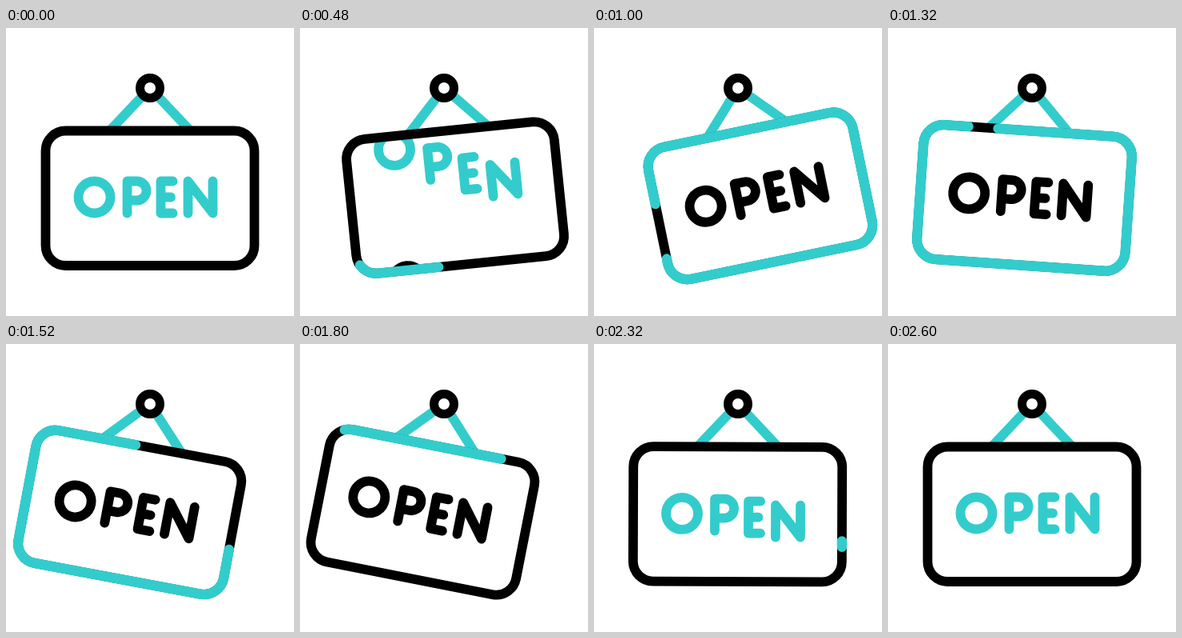
These frames come from a looping animation (360 px wide and 360 px high, 3000 ms). An HTML page:

```html
<!DOCTYPE html>
<html lang="en">
<head>
<meta charset="utf-8">
<title>Open sign</title>
<style>
  html, body { margin: 0; width: 100%; height: 100%; overflow: hidden; background: #fff; }
  svg { display: block; width: 100%; height: 100%; }
  .line { fill: none; stroke-width: 11.8; stroke-linecap: round; stroke-linejoin: round; }
  .teal { stroke: #33cccc; }
  .dark { stroke: #000; }
  #trim { stroke-width: 12.4; }
</style>
</head>
<body>
<svg viewBox="0 0 360 360" role="img" aria-label="OPEN">
  <defs>
    <clipPath id="inside"><rect x="55" y="134" width="250" height="157.5" rx="20"/></clipPath>
    <!-- starts at the bottom right and runs clockwise -->
    <path id="frame" d="M285.5 297H74.5a25 25 0 0 1-25-25V153.5a25 25 0 0 1 25-25H285.5a25 25 0 0 1 25 25V272a25 25 0 0 1-25 25z"/>
    <path id="O" d="M90.5 211.5a20 20 0 0 1 40 0a20 20 0 0 1-40 0z"/>
    <path id="P" d="M151.5 231.5V191.5H163.5a12 12 0 0 1 0 24H151.5"/>
    <path id="E" d="M208.5 191.5H193.5V231.5H208.5M193.5 211.5H206"/>
    <path id="N" d="M227.5 231.5V191.5L258.5 231.5V191.5"/>
  </defs>
  <g id="sign">
    <path class="line teal" d="M130 128L180 75L230 128"/>
    <g id="words" clip-path="url(#inside)"></g>
    <use href="#frame" class="line dark"/>
    <path id="trim" class="line teal"/>
  </g>
  <circle cx="180" cy="75" r="12.5" class="line dark" style="fill:#fff;stroke-width:11"/>
</svg>
<script>
const LOOP = 3000;
const $ = id => document.getElementById(id);
const sign = $('sign'), trim = $('trim'), words = $('words');
trim.setAttribute('d', $('frame').getAttribute('d'));
const LEN = trim.getTotalLength();

const clamp = x => Math.min(1, Math.max(0, x));
const ramp = (t, a, b) => clamp((t - a) / (b - a));
const cubic = x => x < 0.5 ? 4 * x ** 3 : 1 - 4 * (1 - x) ** 3;
const ease = (t, a, b) => cubic(ramp(t, a, b));

// monotone smooth curve through [time, value] points
function curve(pts) {
  const n = pts.length - 1;
  const slope = i => (pts[i + 1][1] - pts[i][1]) / (pts[i + 1][0] - pts[i][0]);
  const m = pts.map((p, i) => {
    if (i === 0 || i === n) return 0;
    const a = slope(i - 1), b = slope(i);
    return a * b > 0 ? 2 * a * b / (a + b) : 0;
  });
  return t => {
    if (t <= pts[0][0]) return pts[0][1];
    if (t >= pts[n][0]) return pts[n][1];
    const i = pts.findIndex(p => p[0] > t) - 1;
    const [t0, v0] = pts[i], [t1, v1] = pts[i + 1];
    const d = t1 - t0, x = (t - t0) / d, y = 1 - x;
    return v0 * (1 + 2 * x) * y * y + v1 * x * x * (3 - 2 * x)
      + d * (m[i] * x * y * y - m[i + 1] * x * x * y);
  };
}

const tailOf = curve([[1000, 0], [1320, 0.045], [1800, 0.755], [2120, 0.96], [2480, 1]]);

function addLetter(id, tone) {
  const el = document.createElementNS('http://www.w3.org/2000/svg', 'use');
  el.setAttribute('href', '#' + id);
  el.setAttribute('class', 'line ' + tone);
  return words.appendChild(el);
}
const letters = [...'OPEN'].map(id => ({ teal: addLetter(id, 'teal'), dark: addLetter(id, 'dark') }));

const shift = (el, y) => el.setAttribute('transform', `translate(0 ${y.toFixed(2)})`);

function drawTrim(t) {
  const x = ramp(t, 130, 2520);
  const spin = x + 0.15 * x * (1 - x);
  const tail = spin + tailOf(t);
  const size = (ease(t, 80, 1355) - tailOf(t)) * LEN;
  trim.style.display = size > 0.5 ? '' : 'none';
  if (size >= LEN - 0.01) {
    trim.style.strokeDasharray = 'none';
    return;
  }
  trim.style.strokeDasharray = `${Math.max(size, 0)} ${LEN - size}`;
  trim.style.strokeDashoffset = -(tail % 1) * LEN;
}

function draw(t) {
  const angle = -12.4 * ease(t, 140, 835) + 23.6 * ease(t, 835, 1680) - 11.2 * ease(t, 1710, 2440);
  sign.setAttribute('transform', `rotate(${angle.toFixed(3)} 180 75)`);
  drawTrim(t);
  letters.forEach(({ teal, dark }, i) => {
    const a = ease(t, 147 + 43 * i, 867 + 43 * i);
    const b = ease(t, 1671 + 34 * i, 2391 + 34 * i);
    shift(teal, t < 1400 ? -166 * a : 180 * (1 - b));
    shift(dark, t < 1400 ? 166 * (1 - a) : -180 * b);
  });
}

const start = performance.now();
function tick() {
  draw((performance.now() - start) % LOOP);
  requestAnimationFrame(tick);
}
draw(0);
requestAnimationFrame(tick);
</script>
</body>
</html>
```
